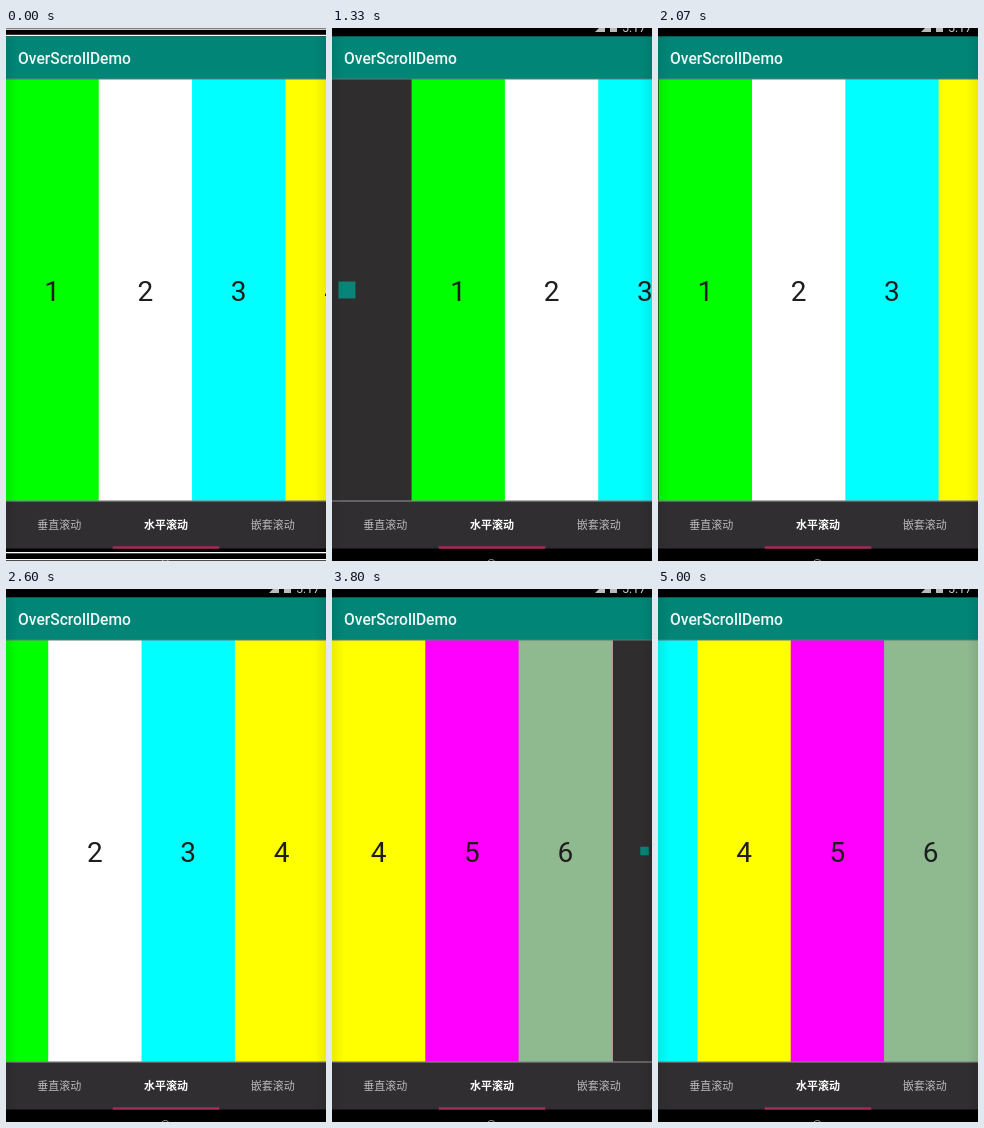
Write an HTML page with a canvas that moves like this. It is 320x533 px and loops after 5.14 s.

```html
<!DOCTYPE html>
<html lang="zh">
<head>
<meta charset="utf-8">
<title>OverScrollDemo</title>
<style>
html, body { margin: 0; width: 100%; height: 100%; overflow: hidden; background: #000; }
canvas { display: block; width: 100vw; height: 100vh; }
</style>
</head>
<body>
<canvas id="stage"></canvas>
<script>
const W = 320, H = 533, LOOP = 5140, TICK = 1000 / 15;
const TOP = 51, BOTTOM = 473, MID = 262;
const PANEL = W * 7 / 24;
const START = -0.6, END = START + W - 6 * PANEL;
const PULL_LEFT = 162.6, PULL_RIGHT = 160.8;
const COLORS = ['#0f0', '#fff', '#0ff', '#ff0', '#f0f', '#8fba90'];
const TABS = ['垂直滚动', '水平滚动', '嵌套滚动'];
const TEAL = '#008577', DARK = '#302e30';
const ROBOTO = 'Roboto, sans-serif';
const CJK = '"Noto Sans CJK SC", "Noto Sans CJK", sans-serif';

const canvas = document.getElementById('stage');
const ctx = canvas.getContext('2d');

function resize() {
  const dpr = window.devicePixelRatio || 1;
  canvas.width = Math.round(innerWidth * dpr);
  canvas.height = Math.round(innerHeight * dpr);
}

function rect(x, y, w, h, color) {
  ctx.fillStyle = color;
  ctx.fillRect(x, y, w, h);
}

function text(str, x, y, font, color, align = 'center') {
  ctx.font = font;
  ctx.textAlign = align;
  ctx.fillStyle = color;
  ctx.fillText(str, x, y);
}

const drag = p => Math.sin(p * Math.PI / 2) ** 1.6;
const settle = p => (1 - p) ** 2.5;
const fling = p => 1 - (1 - p) ** 1.77;

// Left edge of the panel row at a given screen refresh.
function scrollAt(k) {
  const part = (from, to) => Math.min(1, (k - from) / (to - from));
  if (k <= 16) return START;
  if (k <= 25) return START + PULL_LEFT * drag(part(16, 25));
  if (k <= 38) return START + PULL_LEFT * settle(part(25, 32));
  if (k <= 54) return START + (END - START) * fling(part(38, 46));
  if (k <= 69) return END - PULL_RIGHT * drag(part(54, 65));
  return END - PULL_RIGHT * settle(part(69, 75));
}

// The badge grows and moves inward with the pull (0 to 1).
function badge(pull, edge, inward) {
  const size = 34.5 * pull, cx = edge + inward * 30.3 * pull;
  rect(cx - size / 2, MID - size / 2, size, size, '#078578');
}

function drawPanels(offset) {
  const right = offset + 6 * PANEL;
  rect(0, TOP, W, BOTTOM - TOP, '#302d2f');
  badge(Math.max(0, (offset - START) / PULL_LEFT), 0, 1);
  badge(Math.max(0, (END - offset) / PULL_RIGHT), W, -1);
  // Each panel runs to the row's end, so neighbours meet without a seam.
  COLORS.forEach((color, i) => {
    const x = offset + i * PANEL;
    rect(x, TOP, right - x + 0.6, BOTTOM - TOP, color);
  });
  COLORS.forEach((_, i) => {
    text(i + 1, offset + (i + 0.5) * PANEL, 273, '28px ' + ROBOTO, '#1e1e1e');
  });
}

function drawEdge(x0, x1) {
  const g = ctx.createLinearGradient(x0, 0, x1, 0);
  g.addColorStop(0, 'rgba(0,0,0,.08)');
  g.addColorStop(1, 'rgba(0,0,0,0)');
  rect(Math.min(x0, x1), 8, Math.abs(x1 - x0), 512, g);
}

function drawStatus() {
  ctx.fillStyle = '#bbb';
  ctx.beginPath();
  ctx.moveTo(263, 4);
  ctx.lineTo(273, 4);
  ctx.lineTo(273, 0);
  ctx.lineTo(267, 0);
  ctx.fill();
  rect(278, 0, 7, 4, '#bbb');
  text('5:17', 302, 4, '12.5px ' + ROBOTO, '#ccc');
}

function drawSelection() {
  for (const y of [0.5, 6.8, 524, 531]) rect(0, y, W, 1.3, '#fff');
}

function drawTabs() {
  rect(0, BOTTOM, W, 47.5, DARK);
  rect(0, BOTTOM - 0.6, W, 1.2, '#858385');
  TABS.forEach((name, i) => {
    const on = i === 1;
    text(name, W * (2 * i + 1) / 6, 501, (on ? 'bold' : '500') + ' 11px ' + CJK, on ? '#fff' : '#bdbbbd');
  });
  rect(W / 3, 518.3, W / 3, 2.4, '#a8285a');
}

function draw(t) {
  const k = Math.floor((t + 3.5) / TICK);
  ctx.setTransform(canvas.width / W, 0, 0, canvas.height / H, 0, 0);
  rect(0, 0, W, H, '#000');
  drawPanels(scrollAt(k));
  rect(0, 8.3, W, TOP - 8.3, TEAL);
  rect(0, TOP - 0.5, W, 1, '#5c7f7a');
  text('OverScrollDemo', 12, 36, '500 15.6px ' + ROBOTO, '#eef8f6', 'left');
  drawTabs();
  drawEdge(0, 12);
  drawEdge(W, W - 12);
  ctx.strokeStyle = '#999';
  ctx.lineWidth = 1;
  ctx.beginPath();
  ctx.arc(159.3, 536, 4.5, 0, Math.PI * 2);
  ctx.stroke();
  if (k < 1) drawSelection();
  else drawStatus();
}

const start = performance.now();
function loop() {
  draw((performance.now() - start) % LOOP);
  requestAnimationFrame(loop);
}

addEventListener('resize', resize);
resize();
loop();
</script>
</body>
</html>
```
